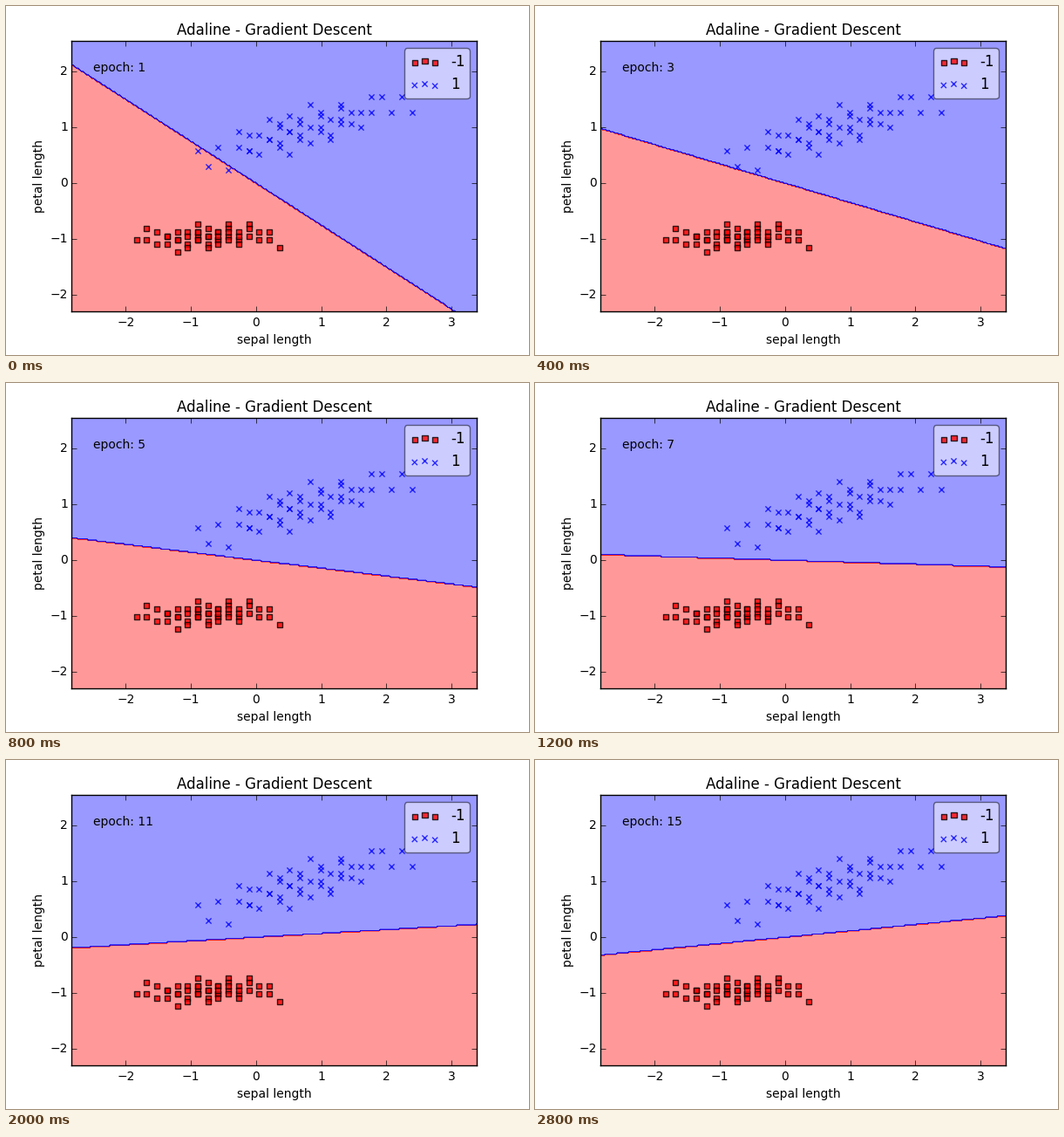
Write a matplotlib script that moves like this. It is 600 px wide and 400 px high and loops after 3000 ms.

```python
import numpy as np
import matplotlib.pyplot as plt
from matplotlib.animation import FuncAnimation
from matplotlib.colors import ListedColormap

plt.style.use("classic")
plt.rcParams.update({
    "font.family": "DejaVu Sans",
    "font.size": 10,
    "figure.subplot.bottom": 0.125,
    "figure.facecolor": "white",
    "savefig.facecolor": "white",
    "ytick.major.pad": 3,
})

EPOCHS = 15
RATE = 0.8
STEP = 0.02
STRIDE = 0.4384
COLORS = ListedColormap(["red", "blue"])

# mean, spread and correlation of (sepal, petal) length in cm for each class
MEANS = np.array([[5.006, 1.464], [5.936, 4.26]])
SPREADS = np.array([[0.349, 0.172], [0.511, 0.465]])
CORRS = np.array([0.267, 0.754])
PHASES = 0.53, 0.70
LOW, HIGH = np.array([4.3, 1.0]), np.array([7.0, 5.1])

# statistics of both classes together
center = MEANS.mean(axis=0)
half = (MEANS[1] - MEANS[0]) / 2
scale = np.sqrt((SPREADS ** 2).mean(axis=0) + half ** 2)
shared = (CORRS * SPREADS.prod(axis=1)).mean() + half.prod()
corr = shared / scale.prod()


def bell(p):
    """Approximate normal quantile."""
    return (p ** 0.14 - (1 - p) ** 0.14) / 0.1975


def cluster(mean, spread, rho, phase, n=50):
    """Evenly ranked, correlated bell-shaped points, measured to 0.1 cm."""
    u = bell(np.linspace(0.02, 0.98, n))
    v = bell(0.02 + 0.96 * ((STRIDE * np.arange(n) + phase) % 1))
    shape = np.column_stack([u, rho * u + np.sqrt(1 - rho ** 2) * v])
    cm = np.clip(np.round(mean + spread * shape, 1), LOW, HIGH)
    return (cm - center) / scale


def train():
    """Weights after each epoch of batch gradient descent."""
    R = np.array([[1, corr], [corr, 1]])
    w = np.zeros(2)
    history = []
    for _ in range(EPOCHS):
        w = w + RATE * (half / scale - R @ w)
        history.append(w)
    return history


weights = train()
low = (LOW - center) / scale - 1
high = (HIGH - center) / scale + 1
xx, yy = np.meshgrid(np.arange(low[0], high[0], STEP),
                     np.arange(low[1], high[1], STEP))

fig, ax = plt.subplots(figsize=(6, 4), dpi=100)
looks = [dict(label="-1", marker="s", c="red", edgecolors="black"),
         dict(label="1", marker="x", c="blue")]
for look, *stats in zip(looks, MEANS, SPREADS, CORRS, PHASES):
    px, py = cluster(*stats).T
    ax.scatter(px, py, s=20, alpha=0.8, linewidths=1, zorder=1, **look)

ax.set_xlim(xx.min(), xx.max())
ax.set_ylim(yy.min(), yy.max())
ax.set_xticks(range(-2, 4))
ax.set_yticks(range(-2, 3))
ax.set_title("Adaline - Gradient Descent")
ax.set_xlabel("sepal length")
ax.set_ylabel("petal length", labelpad=4)
legend = ax.legend(loc="upper right", fancybox=True, framealpha=0.5,
                   scatterpoints=3, handletextpad=0.68)
for text in legend.get_texts():
    text.set_x(2)
caption = ax.text(-2.5, 2, "")
regions = []


def draw(i):
    while regions:
        regions.pop().remove()
    w = weights[i]
    side = np.where(w[0] * xx + w[1] * yy >= 0, 1, -1)
    regions.append(ax.contourf(xx, yy, side, levels=np.linspace(-1, 1, 9),
                               cmap=COLORS, alpha=0.4, zorder=0))
    caption.set_text(f"epoch: {i + 1}")
    return [caption]


anim = FuncAnimation(fig, draw, frames=EPOCHS, interval=200,
                     init_func=lambda: draw(0), repeat=True, repeat_delay=0)
plt.show()
```
